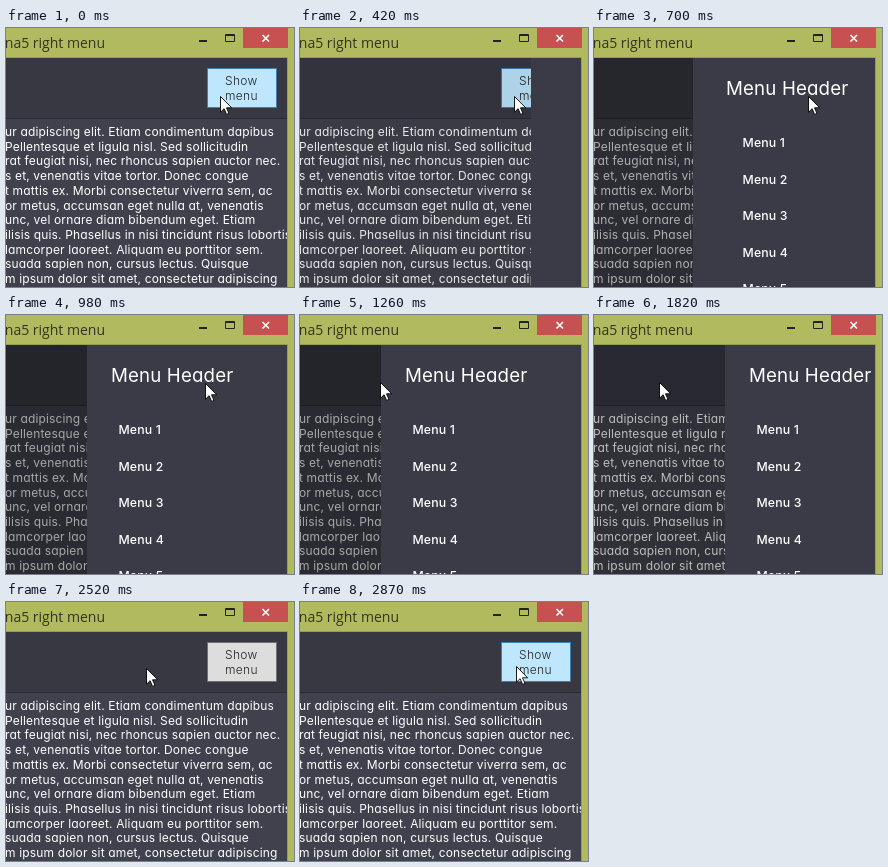
An HTML page for the animation above (3220 ms loop, 288 by 259 pixels).

```html
<!DOCTYPE html>
<html lang="en">
<head>
<meta charset="utf-8">
<title>Sliding right menu</title>
<style>
  html, body { margin: 0; width: 100%; height: 100%; overflow: hidden; background: #b1ba5e; }
  svg { display: block; }
  text { font: 12px Inter, "DejaVu Sans", sans-serif; font-feature-settings: "cv11"; letter-spacing: .15px; fill: #fff; }
  #title { font: 14px "Open Sans", "Noto Sans", sans-serif; letter-spacing: 0; fill: #32341f; }
  #header { font-size: 18.7px; }
  #items text { font-size: 12.3px; font-weight: 500; }
  #button text { fill: #222; font-weight: 300; letter-spacing: .3px; }
  #button rect { fill: #ddd; stroke: #707070; }
  #button.hover rect { fill: #bee6fd; stroke: #3c7fb1; }
</style>
</head>
<body>
<svg width="100%" height="100%" viewBox="0 0 288 259">
  <rect width="288" height="259" fill="#b1ba5e"/>
  <text id="title" x="99" y="20" text-anchor="end">na5 right menu</text>
  <rect x="193" y="12" width="8" height="2" fill="#222"/>
  <path d="M219.5 6.5h9v7h-9zM219 7.5h10" fill="none" stroke="#222"/>
  <rect x="237" width="45" height="20" fill="#c75050"/>
  <path d="M256.5 7l6.5 6.5m0-6.5l-6.5 6.5" stroke="#fff" stroke-width="1.6"/>
  <path d="M0 29.5H281.5V259" fill="none" stroke="#969e50"/>

  <svg y="30" width="281" height="229" viewBox="0 30 281 229">
    <rect y="30" width="281" height="229" fill="#41414d"/>
    <rect y="30" width="281" height="61" fill="#373842"/>
    <rect y="90" width="281" height="1" fill="#2b2b34"/>
    <g id="button">
      <rect x="201.5" y="40.5" width="69" height="39"/>
      <text x="219" y="57">Show</text>
      <text x="219" y="72">menu</text>
    </g>
    <g id="body"></g>
    <rect id="shade" y="30" width="281" height="229"/>
    <g id="menu">
      <rect x="81" y="30" width="200" height="229" fill="#3a3b47"/>
      <text id="header" x="105" y="67">Menu Header</text>
      <g id="items"></g>
    </g>
  </svg>
  <path id="cursor" d="M.5 .5V16.2L4.1 12.7L6.6 18.4L9 17.4L6.5 11.8H11.7Z" fill="#fff" stroke="#000" stroke-width=".9"/>
</svg>
<script>
const LOOP = 3220, STEP = 70, MENU_WIDTH = 200;
const $ = id => document.getElementById(id);

const bodyLines = [
  "ur adipiscing elit. Etiam condimentum dapibus",
  "Pellentesque et ligula nisl. Sed sollicitudin",
  "rat feugiat nisi, nec rhoncus sapien auctor nec.",
  "s et, venenatis vitae tortor. Donec congue",
  "t mattis ex. Morbi consectetur viverra sem, ac",
  "or metus, accumsan eget nulla at, venenatis",
  "unc, vel ornare diam bibendum eget. Etiam",
  "ilisis quis. Phasellus in nisi tincidunt risus lobortis",
  "lamcorper laoreet. Aliquam eu porttitor sem.",
  "suada sapien non, cursus lectus. Quisque",
  "m ipsum dolor sit amet, consectetur adipiscing"
];

function addLines(parent, lines, x, y, pitch) {
  parent.innerHTML = lines.map((line, i) =>
    `<text x="${x}" y="${y + i * pitch}">${line}</text>`).join("");
}
addLines($("body"), bodyLines, -1, 108, 14.7);
addLines($("items"), [1, 2, 3, 4, 5].map(n => `Menu ${n}`), 112.5, 119, 36.5);

const progress = (t, start, duration) => Math.min(1, Math.max(0, (t - start) / duration));
const sineOut = u => Math.sin(u * Math.PI / 2);
const smoother = u => u * u * u * (u * (6 * u - 15) + 10);
const mix = (a, b, u) => a + (b - a) * u;
const move = (id, x, y = 0) => $(id).setAttribute("transform", `translate(${x} ${y})`);

function cursorAt(t) {
  if (t >= 2870) return [216, 64];
  if (t >= 2240) {
    const back = smoother(progress(t, 2240, 560));
    return [mix(65, 214, back), mix(67, 64, back)];
  }
  const away = smoother(progress(t, 840, 560));
  return [mix(214, 65, away), mix(68, 67, away)];
}

function draw(t) {
  const opening = sineOut(progress(t, 340, 495));
  const closing = sineOut(progress(t, 1780, 250));
  const open = opening - closing;
  const [x, y] = cursorAt(t);

  move("menu", Math.round((1 - open) * MENU_WIDTH));
  move("header", (1 - opening) * 100);
  move("items", (1 - opening) * 200);
  $("shade").setAttribute("opacity", .35 * open);
  $("button").classList.toggle("hover", x >= 201);
  move("cursor", Math.round(x), Math.round(y));
}

const origin = performance.now();
function tick() {
  const t = (performance.now() - origin) % LOOP;
  draw(Math.floor(t / STEP) * STEP);
  requestAnimationFrame(tick);
}
tick();
</script>
</body>
</html>
```
